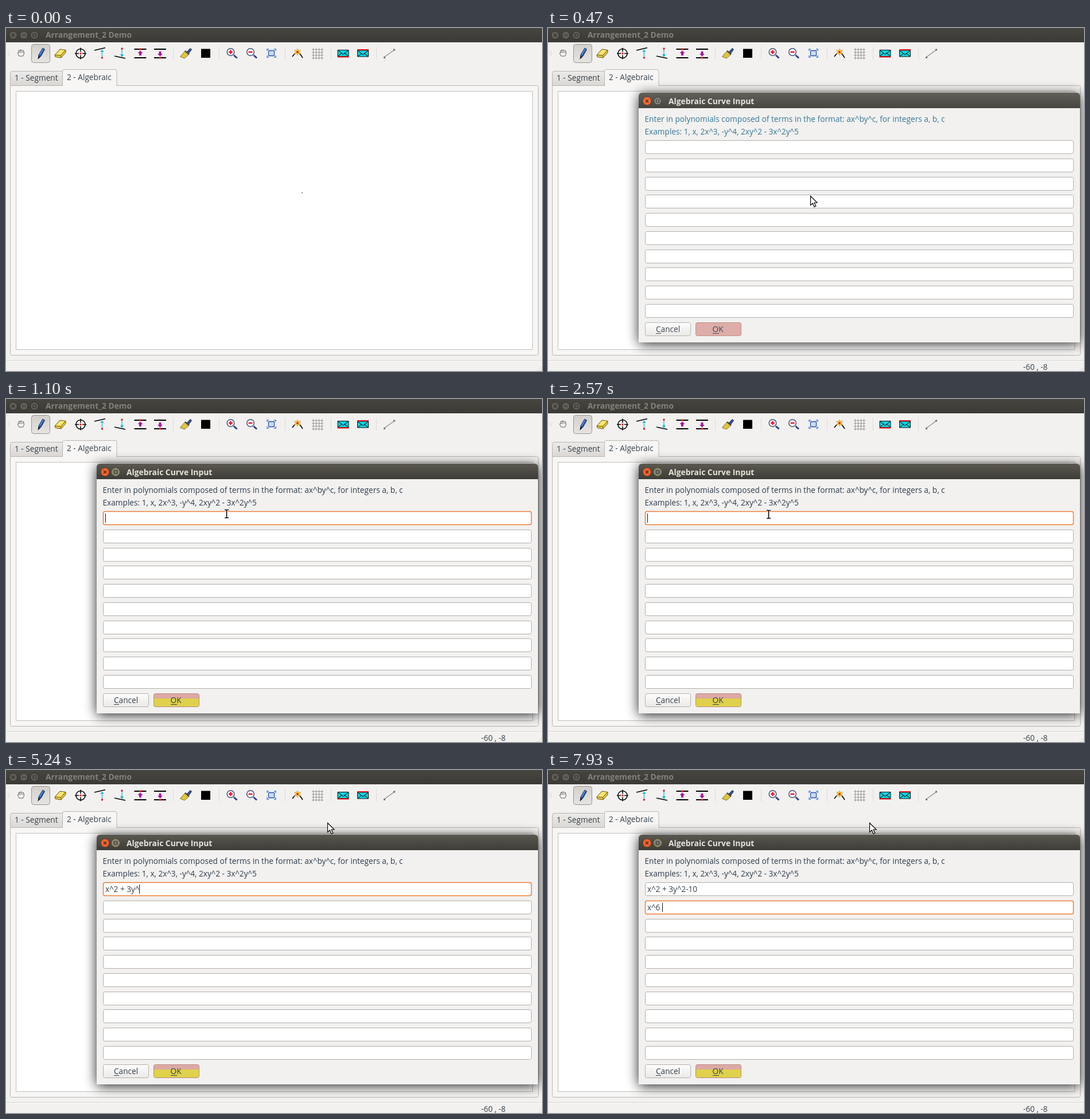
Animation, 934 px wide and 599 px high, one loop 8000 ms. Source, as an HTML page:

```html
<!DOCTYPE html>
<html lang="en">
<head>
<meta charset="utf-8">
<title>Arrangement_2 Demo</title>
<style>
  html, body { margin: 0; width: 100%; height: 100%; overflow: hidden; background: #f2f1f0; }
  svg { display: block; width: 934px; height: 599px; }
  text { font: 13.67px "Open Sans", "Noto Sans", sans-serif; white-space: pre; }
  .title { font-weight: bold; font-size: 13.85px; }
  .k { stroke: #000; fill: none; }
  .cyan { stroke: #1ab5cc; stroke-dasharray: 2 1.2; fill: none; }
</style>
</head>
<body>
<svg viewBox="0 0 934 599" fill="#35404a">
  <defs>
    <linearGradient id="bar" x2="0" y2="1"><stop stop-color="#46453f"/><stop offset="1" stop-color="#3b3a36"/></linearGradient>
    <linearGradient id="dlgBar" x2="0" y2="1"><stop stop-color="#5a5850"/><stop offset="1" stop-color="#3d3c37"/></linearGradient>
    <linearGradient id="tab" x2="0" y2="1"><stop stop-color="#ecebe9"/><stop offset="1" stop-color="#dad7d4"/></linearGradient>
    <linearGradient id="btn" x2="0" y2="1"><stop stop-color="#fdfdfd"/><stop offset="1" stop-color="#ebe9e7"/></linearGradient>
    <linearGradient id="press" x2="0" y2="1"><stop stop-color="#d3d0cc"/><stop offset="1" stop-color="#e6e4e1"/></linearGradient>
    <filter id="blur" x="-20%" y="-20%" width="140%" height="140%"><feGaussianBlur stdDeviation="11"/></filter>
    <g id="lens">
      <path d="M4 4L9.500 9" stroke="#2b3f8c" stroke-width="3"/>
      <circle cx="-1.500" cy="-1.500" r="6.300" fill="#f4f6fb" stroke="#4a5372" stroke-width="1.500"/>
      <path d="M-5 -1.500h7" stroke="#d8122a" stroke-width="2.200"/>
    </g>
    <g id="mail">
      <path d="M-9.500 -5.500h19v11h-19z" fill="#17cfdc" stroke="#111"/>
      <path d="M-9 -5L0 2L9 -5M-9 5L-2.500 0M9 5L2.500 0" class="k"/>
    </g>
    <g id="brackets">
      <path d="M-10.500 -7.500h21M-10.500 7.500h21" class="k" stroke-width="2"/>
      <path d="M-2 -3.500h4v4h2.500L0 5L-4.500 .5h2.500z" fill="#a0189c"/>
    </g>
  </defs>

  <rect width="934" height="599" fill="#f2f1f0"/>
  <rect width="934" height="25" fill="url(#bar)"/>
  <g fill="#5f5d57" stroke="#2f2e2a">
    <circle cx="12.500" cy="12.500" r="7"/><circle cx="31" cy="12.500" r="7"/><circle cx="49.500" cy="12.500" r="7"/>
  </g>
  <path d="M10 10l5 5M15 10l-5 5M28 12.500h6M47 10h5v5h-5z" stroke="#33322e" fill="none" stroke-width="1.200"/>
  <text class="title" x="69" y="17" fill="#85827b">Arrangement_2 Demo</text>

  <path d="M3.500 40v9M5.500 41v8" stroke="#c4c0bb" stroke-dasharray="1 2"/>
  <path d="M291.500 33v22M371.500 33v22M486.500 33v22M566.500 33v22M645.500 33v22" stroke="#dedbd8"/>
  <rect x="44.500" y="28.500" width="32" height="32" rx="4" fill="url(#press)" stroke="#98948f"/>

  <path d="M23 49L20.500 44.500Q20 42 22.500 43.500L22 39.500Q23.200 38 24 40L24.500 38.500Q26 37 26.500 39Q28 37.500 29 39.500Q31 39 31 41.500L31.500 45L29.500 49Z" fill="#fff" stroke="#55524e"/>
  <path d="M24.500 40v4M26.500 39v5M29 40v4" stroke="#55524e" stroke-width=".8"/>

  <path d="M56 54L57 47L64 35L67.500 37.200L61 49Z" fill="#2459ad" stroke="#15264f"/>
  <path d="M58.500 47L65 36" stroke="#6fa2e0" stroke-width="1.300"/>
  <path d="M55.500 54.500L57 49L60 50.500Z" fill="#222"/>

  <path d="M85 47L94 37L104 38.500L104 43L96 52L86 50.500Z" fill="#e8cd45" stroke="#6c5712"/>
  <path d="M85 47L95.500 48L104 38.500M95.500 48L96 52" fill="none" stroke="#6c5712"/>
  <path d="M87 46L94.500 38L102 39L95 47Z" fill="#f7e77b"/>

  <circle cx="130" cy="44.500" r="8" class="k" stroke-width="1.500"/>
  <path d="M120 44.500h7M133 44.500h7M130 34.500v7M130 47.500v7" class="k" stroke-width="1.500"/>
  <circle cx="130" cy="44.500" r="1.700" fill="#e01b24"/>

  <path d="M154 39L173 34.500" class="k" stroke-width="1.700"/>
  <path d="M167.500 40v12" class="cyan" stroke-width="2"/><path d="M164.500 42L167.500 37.500L170.500 42Z" fill="#1ab5cc"/>
  <circle cx="167.500" cy="52" r="1.700" fill="#e01b24"/>
  <path d="M189 49L208 53" class="k" stroke-width="1.700"/>
  <path d="M202 37v11" class="cyan" stroke-width="2"/><path d="M199 46L202 51L205 46Z" fill="#1ab5cc"/>
  <circle cx="202" cy="36" r="1.700" fill="#e01b24"/>

  <use href="#brackets" transform="translate(234 44.500) scale(1 -1)"/><circle cx="234" cy="37" r="1.800" fill="#e01b24"/>
  <use href="#brackets" transform="translate(268.500 44.500)"/><circle cx="268.500" cy="52" r="1.800" fill="#e01b24"/>

  <path d="M315 42L321 35.500L323.500 37.500L318 45Z" fill="#35518f" stroke="#1c2c52"/>
  <path d="M303.500 50L312 40L319 46L311 53Z" fill="#ecd04a" stroke="#7d6a21"/>
  <path d="M312 40L319 46" stroke="#4a4a4a" stroke-width="2.500"/>
  <path d="M306 50L313 43M309 51L316 45" stroke="#a68f2f" stroke-width=".8"/>
  <rect x="340" y="36.500" width="16" height="15.500" fill="#000"/>

  <use href="#lens" x="393" y="43.500"/><path d="M391.500 38.500v7" stroke="#d8122a" stroke-width="2.200"/>
  <use href="#lens" x="427.500" y="43.500"/>
  <rect x="457.500" y="39.500" width="10" height="9" rx="1" fill="#c9dcf7" stroke="#2d4fa5" stroke-width="1.300"/>
  <path d="M455 40v-3h3M467 37h3v3M470 48v3h-3M458 51h-3v-3" fill="none" stroke="#3b7be0" stroke-width="1.400"/>

  <path d="M499 50Q503 44 508 41.500Q512 44 517 52" class="k" stroke-width="1.500"/>
  <path d="M508 36l1.700 3 3.800-.5-2 3.300 2 3.400-3.700-.6-1.800 3.400-1.800-3.400-3.700.6 2-3.400-2-3.300 3.800.5z" fill="#f5c73d" stroke="#d89b25" stroke-width=".6"/>
  <circle cx="508" cy="42" r="1.900" fill="#e01b24"/>
  <path d="M535.500 35v20M540.500 35v20M545.500 35v20M550.500 35v20M533 37.500h20M533 42.500h20M533 47.500h20M533 52.500h20" stroke="#9b9894"/>

  <use href="#mail" x="587.500" y="44"/><path d="M577.500 50.500h20" stroke="#e01b24" stroke-width="2"/>
  <use href="#mail" x="622" y="44.500"/><path d="M612 38h20" stroke="#e01b24" stroke-width="2"/>
  <path d="M659 51L677 38" stroke="#8f8c88" stroke-width="1.300"/>
  <path d="M658 50h3v3h-3zM675 36.500h3v3h-3z" fill="#777470"/>

  <rect x="7.500" y="100.500" width="920" height="471" rx="3" fill="#f7f6f5" stroke="#b9b5b0"/>
  <path d="M7.500 100.500V79q0-3.500 3.500-3.500H98.500V100.500Z" fill="url(#tab)" stroke="#b9b5b0"/>
  <path d="M98.500 101V75.500q0-3 3-3H190q3 0 3 3V101" fill="#f7f6f5" stroke="#b9b5b0"/>
  <text x="15" y="92">1 - Segment</text>
  <text x="106" y="91" font-size="14">2 - Algebraic</text>
  <rect x="17.500" y="110.500" width="900" height="451" fill="#fff" stroke="#c3c0bc"/>
  <rect x="515" y="287" width="2" height="1.500" fill="#777"/>
  <path d="M0 580.500H934" stroke="#d6d3cf"/><path d="M0 581.500H934" stroke="#fbfbfa"/>
  <path d="M926 597.500h7M929 594.500h4M932 591.500h1" stroke="#c4c0bb" stroke-dasharray="1 2"/>
  <text id="status" x="828" y="597"></text>

  <g id="dialog">
    <rect x="158" y="116" width="769" height="436" rx="5" fill="#000" opacity=".88" filter="url(#blur)"/>
    <path d="M158 549V119q0-6 6-6H921q6 0 6 6V549Z" fill="#f2f1f0"/>
    <path d="M158 140V119q0-6 6-6H921q6 0 6 6V140Z" fill="url(#dlgBar)"/>
    <circle cx="172.500" cy="127.500" r="7.300" fill="#f0662f" stroke="#6b3520"/>
    <path d="M170 125l5 5M175 125l-5 5" stroke="#4a2012" stroke-width="1.300"/>
    <circle id="maxBtn" cx="191" cy="127.500" r="6.500" fill="#85827a" stroke="#35342f"/>
    <path d="M188.500 125h5v5h-5z" fill="none" stroke="#33322e" stroke-width="1.200"/>
    <text class="title" x="210" y="132.500" fill="#e6e3db">Algebraic Curve Input</text>
    <g id="labels">
      <text x="168.500" y="164">Enter in polynomials composed of terms in the format: ax^by^c, for integers a, b, c</text>
      <text x="168.500" y="186">Examples: 1, x, 2x^3, -y^4, 2xy^2 - 3x^2y^5</text>
    </g>
    <g id="fields" fill="#fff"></g>
    <text id="line0" x="173" y="213"></text>
    <text id="line1" x="173" y="245"></text>
    <path id="caret" stroke="#111"/>
    <rect x="169.500" y="514.500" width="79" height="23" rx="3" fill="url(#btn)" stroke="#b3afaa"/>
    <text x="188" y="530.500">Cancel</text>
    <rect x="257.500" y="514.500" width="79" height="23" rx="3" fill="#dda9a5" stroke="#bd8a80"/>
    <path id="gold" d="M258 523h78v12q0 2-2 2h-74q-2 0-2-2z" fill="#dfd14c"/>
    <text x="286.500" y="530.500">OK</text>
    <path d="M188 533.500h9M287 533.500h11" stroke="#35404a"/>
  </g>

  <path id="arrow" d="M0 0V16L3.800 12.500L6.500 19L9.300 17.800L6.600 11.500H11.500Z" fill="#fff" stroke="#000" stroke-width="1.200"/>
  <g id="beam" fill="none">
    <path d="M-3.500 -7h2.500L0 -6L1 -7h2.500M-3.500 7h2.500L0 6L1 7h2.500M0 -6V6" stroke="#fff" stroke-width="3.500"/>
    <path d="M-3.500 -7h2.500L0 -6L1 -7h2.500M-3.500 7h2.500L0 6L1 7h2.500M0 -6V6" stroke="#000" stroke-width="1.600"/>
  </g>
</svg>
<script>
const LOOP = 8000, OPEN = 470, FOCUS = 520, NEXT_FIELD = 6660;
const PITCH = 31.78, TOP = 196;
const $ = id => document.getElementById(id);
const show = (id, on) => $(id).setAttribute("display", on ? "inline" : "none");
const set = (id, name, value) => $(id).setAttribute(name, value);

const fields = Array.from({ length: 10 }, (_, i) => {
  const r = document.createElementNS("http://www.w3.org/2000/svg", "rect");
  const box = { x: 169.5, y: Math.round(TOP + i * PITCH) + .5, width: 746, height: 23, rx: 3 };
  for (const name in box) r.setAttribute(name, box[name]);
  return $("fields").appendChild(r);
});

// Each line: full text, then [time, characters visible].
const typed = [
  ["x^2 + 3y^2-10", [[3250, 1], [3750, 3], [4350, 5], [4810, 7], [5240, 9], [5770, 11], [6000, 13]]],
  ["x^6 ", [[7470, 2], [7930, 4]]]
];
const textAt = ([text, keys], t) =>
  text.slice(0, keys.reduce((n, [at, count]) => t >= at ? count : n, 0));

const easeOut = k => 1 - (1 - k) ** 2;
const smooth = k => k * k * (3 - 2 * k);
const mix = (a, b, k) => a.map((v, i) => v + (b[i] - v) * k);
// Progress from start to end in equally spaced jumps.
const stepped = (t, start, end, jumps) =>
  Math.min(1, Math.floor((t - start) / (end - start) * jumps + 1e-6) / jumps);

const ENTRY = [605, 329], REST = [457, 293];
const enterAt = k => mix(ENTRY, REST, easeOut(k));

function pointer(t) {
  if (t < OPEN) return enterAt(stepped(t, 120, 400, 6));
  if (t < FOCUS) return REST;
  if (t < 820) return mix(REST, [476, 303], stepped(t, FOCUS, 620, 2));
  if (t < 1260) return mix([476, 303], [379, 195], smooth((1 + stepped(t, 820, 1100, 7) * 7) / 8));
  if (t < 2570) return [379, 196];
  return mix([379, 196], [559.5, 91.5], smooth(stepped(t, 2570, 2770, 5)));
}

function statusAt(t) {
  const k = stepped(t, 120, 400, 6);
  if (t < 120 || k === 0) return "";
  const [x, y] = t < OPEN ? enterAt(k - 1 / 6) : REST;
  return `${Math.round(x - 517)} , ${Math.round(285 - y)}`;
}

function render(t) {
  const focused = t >= FOCUS;
  show("dialog", t >= OPEN);
  set("dialog", "opacity", focused ? 1 : .95);
  set("labels", "fill", focused ? "#2f3c4c" : "#2c7090");
  set("maxBtn", "stroke", focused ? "#a39a4c" : "#35342f");
  show("gold", focused);
  $("status").textContent = statusAt(t);

  const active = t >= NEXT_FIELD ? 1 : 0;
  fields.forEach((f, i) => {
    const on = focused && i === active;
    f.setAttribute("stroke", on ? "#ee7d3c" : "#b1ada8");
    f.setAttribute("stroke-width", on ? 1.5 : 1);
  });
  typed.forEach((line, i) => { $("line" + i).textContent = textAt(line, t); });
  show("caret", focused);
  const width = t >= OPEN ? $("line" + active).getComputedTextLength() : 0;
  const caretX = 173.5 + Math.round(width);
  set("caret", "d", `M${caretX} ${200 + active * 32}v16`);

  const [x, y] = pointer(t).map(Math.round);
  const row = y + 5 - TOP;
  const overField = focused && row >= 0 && row % PITCH < 24;
  show("arrow", t >= 120 && !overField);
  show("beam", overField);
  set("arrow", "transform", `translate(${x + .5} ${y + .5})`);
  set("beam", "transform", `translate(${x + 5.5} ${y + 5.5})`);
}

const start = performance.now();
function frame() {
  render((performance.now() - start) % LOOP);
  requestAnimationFrame(frame);
}
render(0);
requestAnimationFrame(frame);
</script>
</body>
</html>
```
